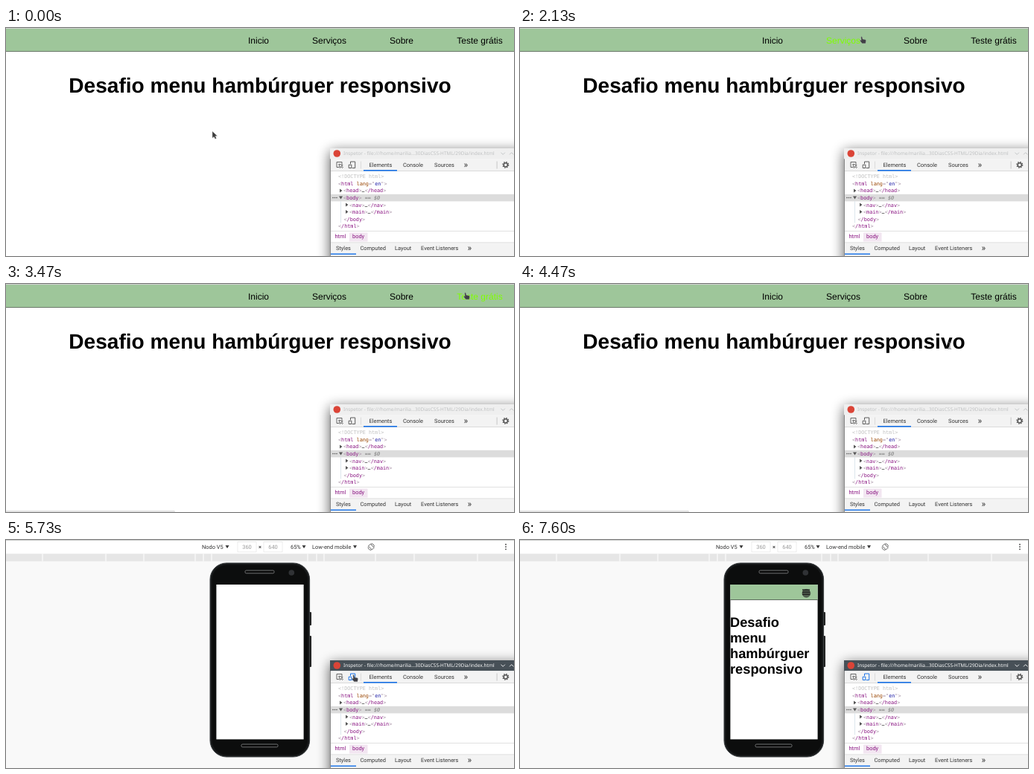
Animation of 682 by 307 pixels, one loop 8000 ms. Source, as an HTML page:

```html
<!DOCTYPE html>
<html lang="pt">
<head>
<meta charset="utf-8">
<title>Menu responsivo</title>
<style>
html, body { margin: 0; width: 100%; height: 100%; overflow: hidden; background: #fff; }
svg { display: block; width: 100%; height: 100%; }
text { white-space: pre; text-rendering: geometricPrecision; }
.page { font-family: "Liberation Sans", Arial, sans-serif; }
.ui { font-family: Roboto, sans-serif; font-size: 7.45px; fill: #333; }
.code { font-family: "DejaVu Sans Mono", monospace; font-size: 6.8px; fill: #881280; }
.title { font-family: "Noto Sans", sans-serif; font-size: 6.5px; }
</style>
</head>
<body>
<svg id="stage" viewBox="0 0 682 307" xmlns="http://www.w3.org/2000/svg"></svg>
<script>
const LOOP = 8000, FPS = 15;
const ACTIVE = 82, MOBILE = 86, LOADED = 88, LABEL_END = 104;

const rect = (x, y, w, h, fill, more = '') =>
  `<rect x="${x}" y="${y}" width="${w}" height="${h}" fill="${fill}" ${more}/>`;
const text = (x, y, str, more = '') => `<text x="${x}" y="${y}" ${more}>${str}</text>`;
const path = (d, more = '') => `<path d="${d}" ${more}/>`;
const ui = (x, y, str, more = '') => text(x, y, str, 'class="ui" ' + more);
const down = (x, y) => path(`M${x} ${y}h5l-2.5 4z`, 'fill="#333"');
const tint = (s, fill) => `<tspan fill="${fill}">${s}</tspan>`;
const tag = s => tint('&lt;', '#a894a6') + s + tint('&gt;', '#a894a6');
const pair = s => tag(s) + tint('…', '#333') + tag('/' + s);

const links = [['Inicio', 325, 353], ['Serviços', 411, 457], ['Sobre', 515, 547], ['Teste grátis', 605.3, 667]];

function desktop() {
  return rect(0, 1, 682, 306, '#fff') + rect(0, 1, 682, 30, '#9ec69a') + rect(0, 31, 682, 1, '#6b786a') +
    links.map(([s, x], i) => text(x, 20.5, s, `class="page" id="link${i}" font-size="12"`)).join('') +
    text(341, 87, 'Desafio menu hambúrguer responsivo',
      'class="page" font-size="28.08" font-weight="700" text-anchor="middle"') +
    `<g id="status">${rect(-2, 305.4, 228.5, 5, '#e4e4e4', 'stroke="#ccc" stroke-width=".5" rx="1"')}</g>`;
}

function deviceBar() {
  const cuts = [49, 134, 185, 254, 265, 276, 405, 417, 427, 496, 548, 633];
  return rect(0, 1, 682, 306, '#f9f9f9') + rect(0, 1, 682, 28, '#fff') + rect(0, 18.5, 682, 10.2, '#e6e6e6') +
    cuts.map(x => rect(x - .5, 18.5, 1, 10.2, '#fff')).join('') +
    ui(263, 11.8, 'Nodo V5') + down(294.5, 7.2) +
    [[311, 360], [346, 640]].map(([x, n]) => rect(x, 2.5, 25, 13.5, '#fff', 'stroke="#e8e8e8" stroke-width=".8"') +
      ui(x + 12.5, 11.8, n, 'text-anchor="middle" style="fill:#999"')).join('') +
    ui(341, 11.8, '×', 'text-anchor="middle" font-weight="500"') +
    ui(382, 11.8, '65%') + down(397.5, 7.2) + ui(411, 11.8, 'Low-end mobile') + down(466, 7.2) +
    '<g fill="none" stroke="#444" stroke-width=".8"><rect x="488.3" y="5.7" width="4" height="7" transform="rotate(-45 490.3 9.2)"/>' +
    path('M490 5a4.3 4.3 0 0 1 4.4 4M490.5 13.5a4.3 4.3 0 0 1-4.4-4') + '</g>' +
    [6, 9.2, 12.4].map(y => `<circle cx="671" cy="${y}" r=".9" fill="#444"/>`).join('');
}

function phone() {
  const words = ['Desafio', 'menu', 'hambúrguer', 'responsivo'];
  const slot = (x, y, w) => rect(x, y, w, 3.8, '#090909', 'rx="1.5" stroke="#8b8d8e" stroke-width=".8"');
  return rect(406, 97, 4, 18, '#222', 'rx="1"') + rect(406, 129, 4, 42, '#222', 'rx="1"') +
    rect(274, 31, 133.6, 261, '#17191a', 'rx="22" stroke="#3c4042"') +
    rect(276.5, 33.5, 128.6, 256, '#0c0d0d', 'rx="20"') +
    slot(321, 41, 39) + slot(316, 275, 49) +
    '<circle cx="383.3" cy="44" r="3.8" fill="#303235"/>' +
    rect(282.4, 60, 117.2, 208.4, '#fff') +
    `<g id="site">${rect(282.4, 60, 117.2, 20.2, '#9ec69a')}${rect(282.4, 80, 117.2, .8, '#3d4a3c')}` +
    [67, 70, 73].map(y => rect(379, y - .5, 10, 1.3, '#111')).join('') +
    words.map((s, i) => text(282, 116.7 + i * 21.05, s, 'class="page" font-size="18.25" font-weight="700"')).join('') + '</g>' +
    `<g id="label">${rect(347.3, 60, 52.3, 12.8, '#f3f4f3', 'fill-opacity=".95"')}` +
    ui(350, 69.2, '233px × 416px', 'style="font-size:7.07px"') + '</g>';
}

function inspector() {
  const rows = [
    [446, tint('&lt;!DOCTYPE html&gt;', '#c0c0c0')],
    [446, tag(`html ${tint('lang', '#994500')}${tint('="', '#a894a6')}${tint('en', '#1a1aa6')}${tint('"', '#a894a6')}`)],
    [453, pair('head'), 1],
    [453, tag('body') + '<tspan fill="#777" font-style="italic"> == $0</tspan>', 2],
    [461, pair('nav'), 1], [461, pair('main'), 1],
    [453.5, tag('/body')], [446, tag('/html')]
  ];
  const arrow = (x, y, kind) => path(kind == 1 ? `M${x - 5} ${y - 5}v5l3.5-2.5z` : `M${x - 6} ${y - 4.5}h5l-2.5 4z`, 'fill="#555"');
  return rect(435, 166, 260, 160, '#000', 'filter="url(#blur)" opacity=".65"') +
    rect(435, 162, 247, 145, '#8a8a8a') + rect(436, 162, 246, 145, '#fff') +
    rect(435, 162, 247, 14.3, '#efefef', 'id="bar"') +
    '<circle cx="444.3" cy="169" r="4.8" fill="#db4437"/>' +
    `<g id="caption">${text(453, 171.4, 'Inspetor - file:///home/marilia...30DiasCSS-HTML/29Dia/index.html', 'class="title"')}` +
    path('M664.5 167.7l2.7 2.7 2.7-2.7M676 170.4l2.7-2.7 2.7 2.7', 'fill="none" stroke="currentColor" stroke-width=".9"') + '</g>' +
    rect(436, 176.3, 246, 16, '#f3f3f3') + rect(436, 192, 246, .7, '#ccc') +
    path('M447 187.5h-3v-7h7v3M446.8 183.2l1.6 5.3 1.1-2 2 2 .9-.9-2-2 1.800-1z', 'fill="none" stroke="#555" stroke-width=".9"') +
    path('M462.5 183v-3h6.2v8.500h-4M460.200 184.200h3.600v4.300h-3.600z', 'id="toggle" fill="none" stroke-width="1"') +
    rect(476, 179.5, .6, 10, '#ccc') + rect(658.7, 179.5, .8, 10, '#bbb') +
    ui(487.5, 187.2, 'Elements') + ui(533, 187.2, 'Console') + ui(575, 187.2, 'Sources') +
    ui(614.5, 187.8, '»', 'style="font-size:12px"') + rect(480, 191, 45, 1.6, '#1a73e8') +
    '<circle cx="670.8" cy="184.3" r="2.6" fill="none" stroke="#555" stroke-width="1.5"/>' +
    '<circle cx="670.8" cy="184.3" r="3.9" fill="none" stroke="#555" stroke-width="1.3" stroke-dasharray="1.53"/>' +
    rect(436, 223.8, 246, 9.6, '#dcdcdc') + rect(449, 233.4, .7, 29, '#cfdbe6') +
    [439, 441.5, 444].map(x => `<circle cx="${x}" cy="228.5" r=".8" fill="#555"/>`).join('') +
    rows.map(([x, s, kind], i) => {
      const y = 202.3 + i * 9.55;
      return (kind ? arrow(x, y, kind) : '') + text(x, y, s, 'class="code"');
    }).join('') +
    rect(436, 273, 246, .7, '#d5d5d5') + rect(461, 275.5, 24.5, 12, '#f2e6f1') +
    ui(441.5, 283.4, 'html', 'style="fill:#881280"') + ui(465, 283.4, 'body', 'style="fill:#881280"') +
    rect(436, 288.8, 246, 18.2, '#f3f3f3') + rect(436, 288.6, 246, .6, '#ccc') +
    [['Styles', 443], ['Computed', 475.5], ['Layout', 522], ['Event Listeners', 557]].map(([s, x]) => ui(x, 299, s)).join('') +
    ui(619.5, 299.6, '»', 'style="font-size:12px"') + rect(436, 303.6, 34, 1.5, '#1a73e8');
}

const pointers = {
  arrow: path('M0 0v9.3l2.2-1.9 1.6 3 1.7-.9-1.5-2.9h2.8z', 'fill="#3c3c3c" stroke="#ddd" stroke-width=".4"'),
  hand: path('M-1 .3q1-.9 1.7.2l.7 3 4 .9q1 .4.8 1.5l-.6 3.9h-4.9l-3.2-4q0-1.3 1.3-.8l.7.5z',
    'fill="#3f3f45" stroke="#bbb" stroke-width=".3" transform="translate(-.3 -.3) scale(.93)"'),
  beam: path('M-2-4.5q2 0 2 1v7q0 1 2 1M2-4.5q-2 0-2 1M0 3.5q0 1-2 1', 'fill="none" stroke="#666" stroke-width=".9"'),
  touch: '<circle r="5.4" fill="#222" fill-opacity=".6" stroke="#222" stroke-width=".5"/>'
};

document.getElementById('stage').innerHTML =
  '<defs><filter id="blur" x="-20%" y="-30%" width="140%" height="160%"><feGaussianBlur stdDeviation="8.5"/></filter></defs>' +
  rect(0, 0, 682, 1, '#d0d2d0') + `<g id="desktop">${desktop()}</g><g id="mobile">${deviceBar()}${phone()}</g>` +
  inspector() + '<g id="pointer">' +
  Object.entries(pointers).map(([k, s]) => `<g id="${k}">${s}</g>`).join('') + '</g>';

// tick, x, y of the pointer's hot spot
const route = [
  [0, 277, 139], [3, 277, 147], [5, 281, 130], [8, 305, 75], [11, 330, 24], [13, 339, 14],
  [16, 353, 29], [19, 395, 27], [24, 458, 12], [31, 458, 12], [32, 459, 12], [33, 478, 24],
  [35, 522, 7], [36, 522, 7], [37, 524, 10], [43, 541, 14], [49, 600, 10], [50, 600, 10],
  [52, 617, 12], [53, 617, 12], [55, 620, 13], [57, 620, 13], [59, 626, 12], [60, 626, 12],
  [62, 618, 29], [63, 618, 29], [65, 597, 62], [66, 597, 62], [67, 577, 83], [68, 577, 83],
  [71, 475, 172], [72, 475, 172], [73, 466, 178], [75, 466, 178], [77, 467, 182], [98, 467, 182],
  [99, 461, 177], [100, 461, 177], [108, 385, 73], [111, 385, 73], [114, 384.4, 71.8], [120, 384.4, 71.8]
];

function locate(n) {
  const i = route.findIndex(k => k[0] > n);
  const [t0, x0, y0] = route[i - 1], [t1, x1, y1] = route[i], f = (n - t0) / (t1 - t0);
  return [x0 + (x1 - x0) * f, y0 + (y1 - y0) * f];
}

const $ = id => document.getElementById(id);
const show = (id, on) => { $(id).style.display = on ? '' : 'none'; };
const inside = (x, y, l, t, r, b) => x >= l && x <= r && y >= t && y <= b;

function draw(ms) {
  const n = Math.floor((ms % LOOP) * FPS / 1000 + .06) % (LOOP * FPS / 1000);
  const [x, y] = locate(n);
  const mobile = n >= MOBILE, active = n >= ACTIVE;
  const onToggle = inside(x, y, 457, 175, 473, 192);
  let kind = onToggle ? 'hand' : 'arrow';

  links.forEach(([, l, r], i) => {
    const over = !mobile && inside(x, y, l, 9, r + 3, 24);
    if (over) kind = 'hand';
    $('link' + i).setAttribute('fill', over ? '#7fff00' : '#000');
  });
  if (!mobile && inside(x, y, 85, 64, 597, 95)) kind = 'beam';
  if (mobile && inside(x, y, 282, 60, 400, 268)) kind = 'touch';

  show('desktop', !mobile);
  show('mobile', mobile);
  show('site', n >= LOADED);
  show('label', n >= LOADED && n < LABEL_END);
  show('status', n >= 51 && n < ACTIVE);
  $('bar').setAttribute('fill', active ? '#475057' : '#efefef');
  $('caption').setAttribute('style', active ? 'fill:#fcfcfc;color:#fcfcfc' : 'fill:#bfc1c2;color:#bfc1c2');
  $('toggle').setAttribute('stroke', mobile ? '#1a73e8' : onToggle ? '#333' : '#5a5a5a');
  for (const k in pointers) show(k, k === kind);
  $('pointer').setAttribute('transform', `translate(${x} ${y})`);
}

const start = performance.now();
function loop() {
  draw(performance.now() - start);
  requestAnimationFrame(loop);
}
loop();
</script>
</body>
</html>
```
